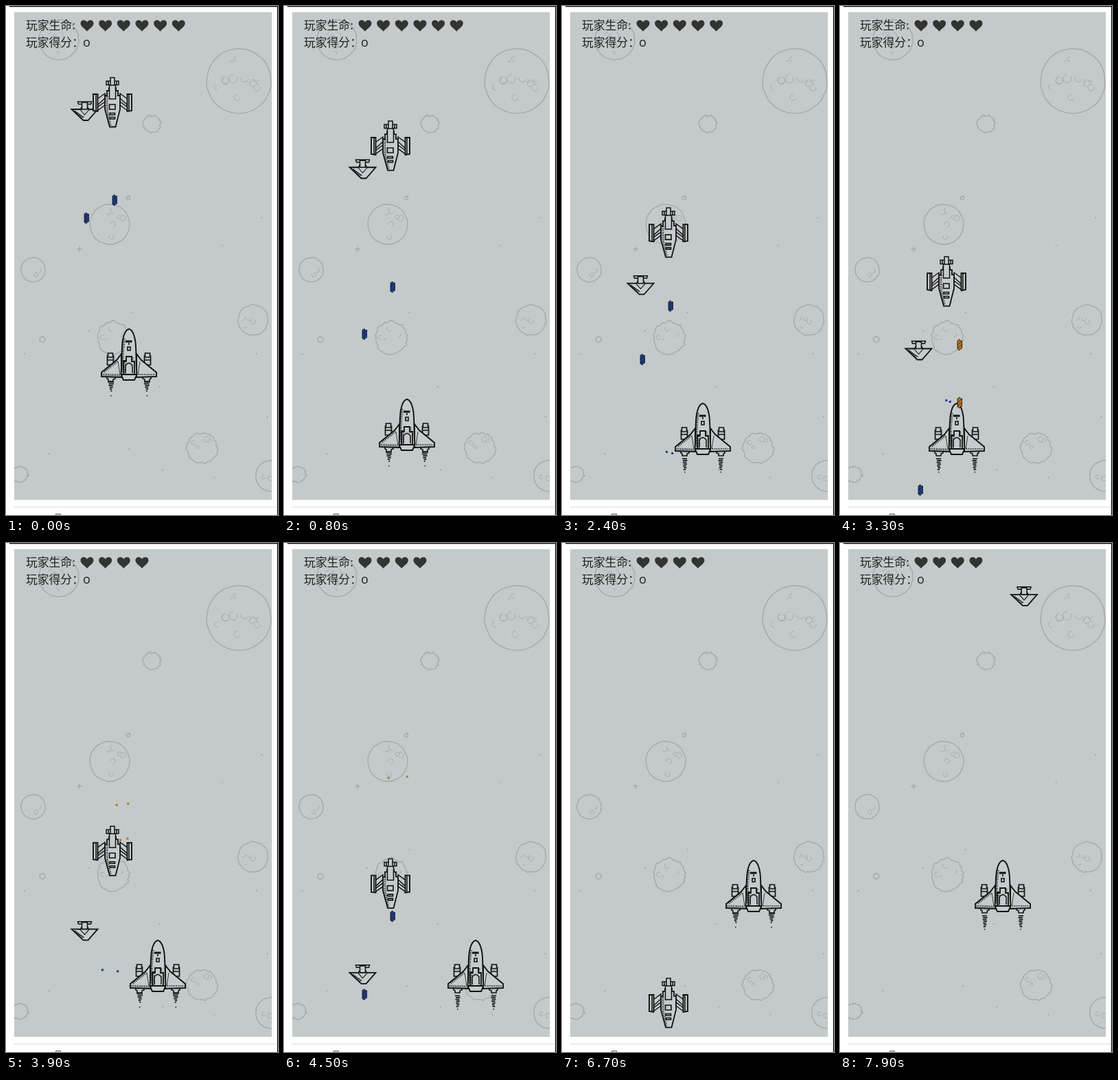
Recreate the animation shown at these times as an HTML page with a canvas. Size 396x739 px, loop 8 s.

```html
<!DOCTYPE html>
<html lang="zh">
<head>
<meta charset="utf-8">
<style>
html, body { margin: 0; width: 100%; height: 100%; overflow: hidden; background: #fff }
canvas { display: block }
</style>
</head>
<body>
<canvas id="stage" width="396" height="739"></canvas>
<script>
const g = document.getElementById('stage').getContext('2d');
const SKY = '#c4caca', HULL = '#c6cbcb', INK = '#111313', ROCK = '#a2a8a8';
const BLUE = '#1c3c86', ORANGE = '#c0701a';
const LOOP = 8000, STEP = 100, TAU = Math.PI * 2;

const PLAYER_SPEED = .17, SHOT_SPEED = .3, RELOAD = 2850, DEBRIS_LIFE = 900;
const fighter = { x: 155, top: 103, speed: .0788, muzzle: 76, gunX: 158, firstShot: -1307 };
const scout = { x: 114.5, top: 138, speed: .1053, muzzle: 35, gunX: 117, firstShot: -1282 };
const nextScout = { x: 268, top: -769, speed: scout.speed };
const playerHits = [2250, 3250];
const playerShots = [3020, 3300];

// Key presses: time, then the point the player flies to
const moves = [
  [200, 179, 577], [1000, 246, 610], [1900, 205, 610], [2200, 205, 576],
  [2750, 170, 576], [3600, 279, 576], [4650, 279, 460], [7100, 237, 460]
];

const topOf = (ship, t) => ship.top + ship.speed * t;
const shotY = (ship, n, t) =>
  topOf(ship, t) + ship.muzzle + ship.speed * (t - ship.firstShot - n * RELOAD);

function playerAt(t) {
  let x = 179, y = 468;
  for (const [start, toX, toY] of moves) {
    if (t <= start) break;
    const k = Math.min(1, (t - start) * PLAYER_SPEED / Math.hypot(toX - x, toY - y));
    x += (toX - x) * k;
    y += (toY - y) * k;
  }
  return [x, y];
}

function randomizer(seed) {
  return () => (seed = seed * 16807 % 2147483647) / 2147483647;
}

function at(x, y, draw) {
  g.save();
  g.translate(x, y);
  draw();
  g.restore();
}

function shape(d, fill, width = 1.7, ink = INK) {
  const p = new Path2D(d);
  if (fill) { g.fillStyle = fill; g.fill(p); }
  if (width) { g.strokeStyle = ink; g.lineWidth = width; g.stroke(p); }
}

function hatch(d, width = 3) {
  g.setLineDash([1, 1.6]);
  shape(d, null, width);
  g.setLineDash([]);
}

function mirrored(draw) {
  draw();
  g.scale(-1, 1);
  draw();
  g.scale(-1, 1);
}

function rock(x, y, r, rough) {
  const rnd = randomizer(x * 991 + y * 37);
  for (let i = 0; i < 5; i++) rnd();
  g.strokeStyle = ROCK;
  g.lineWidth = 1.3;
  g.beginPath();
  for (let a = 0; a <= TAU; a += .15)
    g.lineTo(x + (r + rough * (rnd() - .5)) * Math.cos(a), y + (r + rough * (rnd() - .5)) * Math.sin(a));
  g.closePath();
  g.stroke();
  g.lineWidth = .9;
  for (let i = 4; i < r / 3; i++) {
    const a = rnd() * TAU, d = r * .75 * Math.sqrt(rnd()), from = rnd() * TAU;
    g.beginPath();
    g.arc(x + d * Math.cos(a), y + d * Math.sin(a), 2 + r * .1 * rnd(), from, from + 2 + 4 * rnd());
    g.stroke();
  }
}

function sky() {
  g.fillStyle = SKY;
  g.fillRect(12, 9, 375, 708);
  const rocks = [
    [77, 49, 29, 1], [339, 109, 47, 1], [212.5, 171, 12.5, 3], [151, 317, 29, 1],
    [39.5, 383, 17.7, 1], [156, 482, 23.5, 4], [359.5, 456, 22, 2], [285.5, 642, 22, 3],
    [20, 680, 11.5, 2], [386, 682, 22.5, 1], [53, 484, 4, 0], [178, 279, 2.5, 0]
  ];
  for (const r of rocks) rock(...r);
  const rnd = randomizer(4242);
  g.fillStyle = ROCK;
  for (let i = 0; i < 14; i++) g.fillRect(20 + 360 * rnd(), 150 + 540 * rnd(), 2, 2);
  shape('M103 353h8M107 349v8', null, 1, '#979d9d');
}

function flame(t) {
  const short = (t + 70) % 260 < 130, rows = short ? 6 : 7;
  g.fillStyle = INK;
  for (let i = 0; i < rows; i++) {
    const w = short ? 9 - 1.4 * i : 7 - .6 * i;
    g.fillRect(-26.5 - w / 2 + (i % 2) * .8, (short ? 77 : 80.5) + 2.6 * i, w, 1.7);
  }
  g.fillRect(-27, short ? 97 : 100, 1.5, 1.5);
}

function playerShip(t) {
  mirrored(() => {
    shape('M-30.500 36h7v4h1v13h-9V40h1zM-31 42h9M-31 46h9', HULL, 1.7);
    shape('M-32 70h12v3l-3 1v3h-7v-3l-2-1z', HULL, 1.6);
    shape('M-11 37L-18 46L-40 64V70L-11 71Z', HULL, 1.9);
    shape('M-16 48L-13 67', null, .8);
    flame(t);
  });
  hatch('M-38 67L-12 68');
  hatch('M-36 63L-17 48');
  hatch('M14 67L38 67', 2);
  shape('M0 1C-5 2-8 10-9.500 20C-11 35-10 50-11.500 67L-8 75H8L11.500 67C10 50 11 35 9.500 20C8 10 5 2 0 1Z', HULL, 1.9);
  hatch('M-7 15L-9 35L-9 64', 3.5);
  shape('M-5 17.500H4.500V20.500H-5Z', INK, 0);
  shape('M0 21v3M-2 27h4v5h-4z', null, 1.6);
  shape('M-8 67V48H-4V41H4V48H8V67M-11 67H11', null, 1.8);
  shape('M-5 65V54Q0 47 5 54V65', null, 1.5);
  hatch('M-6 46V66M5 42V50', 3);
}

function fighterShip() {
  mirrored(() => {
    shape('M-22 32L-11 24V31L-22 41ZM-22 44L-11 36V41L-22 49Z', HULL, 1.4);
    shape('M-28 25h6.500v25l-6.500-1z', HULL, 1.9);
    shape('M-24 26V49', null, 1.5);
  });
  shape('M-5 16H5V20H8V27H11V47L4.500 72.500H-4L-11 47V27H-8V20H-5Z', HULL, 1.8);
  shape('M-9 6H9V11.500H-9Z', HULL, 1.5);
  shape('M-3 1H3V12H-3ZM-4.500 12H4.500V32H-4.500ZM-6 6V11M6 6V11', HULL, 1.5);
  shape('M-4.500 40h8.500v7h-8.500zM-4 52.500h7.500v2.500h-7.500zM-3.500 58.500h7v2.500h-7z', null, 1.6);
  hatch('M-8 28V48L-3 70', 3);
}

function scoutShip() {
  shape('M-19 12H-6L-4 9H4L6 12H19L5 28H-2Z', HULL, 1.8);
  shape('M-10 1H10L9 4.500H-9Z', HULL, 1.5);
  shape('M-4 2H4V12H-4Z', HULL, 1.6);
  shape('M-7 12L0 20L7 12M-16 14L-1 24', null, 1.1);
  hatch('M-14 15L-2 25');
}

function bullet(x, y, color) {
  at(x, y, () => {
    shape('M-3-6L0-8L1-6L3.500-6V5L1 6L0 8L-3 6Z', color, .8);
    shape('M-3 0L3-5M-3 5L3 0', null, .7);
  });
}

// A pair of sparks that drifts on at half the bullet's speed
function debris(x, y, velocity, age, color) {
  if (age >= DEBRIS_LIFE) return;
  g.fillStyle = color;
  for (const side of [-1, 1]) {
    const dx = side * (2 + .014 * age) - .01 * age;
    const dy = velocity / 2 * age + side * Math.sign(velocity);
    g.fillRect(x + dx - 1.5, y + dy - 1.5, 3, 3);
  }
}

function enemyFire(ship, hits, t) {
  for (let n = 0; ship.firstShot + n * RELOAD < t; n++) {
    const end = hits[n];
    if (t < (end ?? LOOP)) bullet(ship.gunX, shotY(ship, n, t), BLUE);
    else debris(ship.gunX, shotY(ship, n, end), ship.speed * 2, t - end, BLUE);
  }
}

function playerFire(t) {
  for (const fired of playerShots) {
    const flight = (504 - topOf(fighter, fired)) / (SHOT_SPEED + fighter.speed);
    const age = t - fired;
    if (age < 0) continue;
    if (age < flight) bullet(174, 576 - SHOT_SPEED * age, ORANGE);
    else debris(174, 576 - SHOT_SPEED * flight, -SHOT_SPEED, age - flight, ORANGE);
  }
}

function panel(t) {
  g.fillStyle = '#222';
  g.font = '16.8px "Noto Sans CJK SC", "Noto Sans CJK", sans-serif';
  g.fillText('玩家生命:', 29, 34);
  g.fillText('玩家得分：', 29, 59);
  g.font = '18px "Open Sans", sans-serif';
  g.fillText('o', 112, 59);
  const lives = 6 - playerHits.filter(h => t >= h).length;
  for (let i = 0; i < lives; i++)
    at(118 + 26.65 * i, 20.5, () =>
      shape('M0 16.500C-2 13-9.500 10-9.500 4.500C-9.500-1-2-1.500 0 3C2-1.500 9.500-1 9.500 4.500C9.500 10 2 13 0 16.500Z', '#333', 0));
}

function page() {
  g.fillStyle = '#fff';
  g.fillRect(0, 0, 396, 739);
  g.fillStyle = '#111';
  g.fillRect(5, 0, 391, 1.3);
  g.fillRect(394.8, 0, 1.2, 739);
  g.setLineDash([1, 1]);
  shape('M12 727.500H394', null, 1, '#bbb');
  g.setLineDash([]);
  shape('M72.500 740V737.500H79.500V740', null, 1, '#555');
}

function draw(t) {
  page();
  g.save();
  g.beginPath();
  g.rect(12, 9, 375, 708);
  g.clip();
  sky();
  for (const [ship, look] of [[scout, scoutShip], [nextScout, scoutShip], [fighter, fighterShip]])
    at(ship.x, topOf(ship, t), look);
  at(...playerAt(t), () => playerShip(t));
  enemyFire(fighter, playerHits, t);
  enemyFire(scout, [], t);
  playerFire(t);
  panel(t);
  g.restore();
}

function tick() {
  const t = performance.now() % LOOP;
  draw(Math.floor(t / STEP) * STEP);
  requestAnimationFrame(tick);
}
tick();
</script>
</body>
</html>
```
